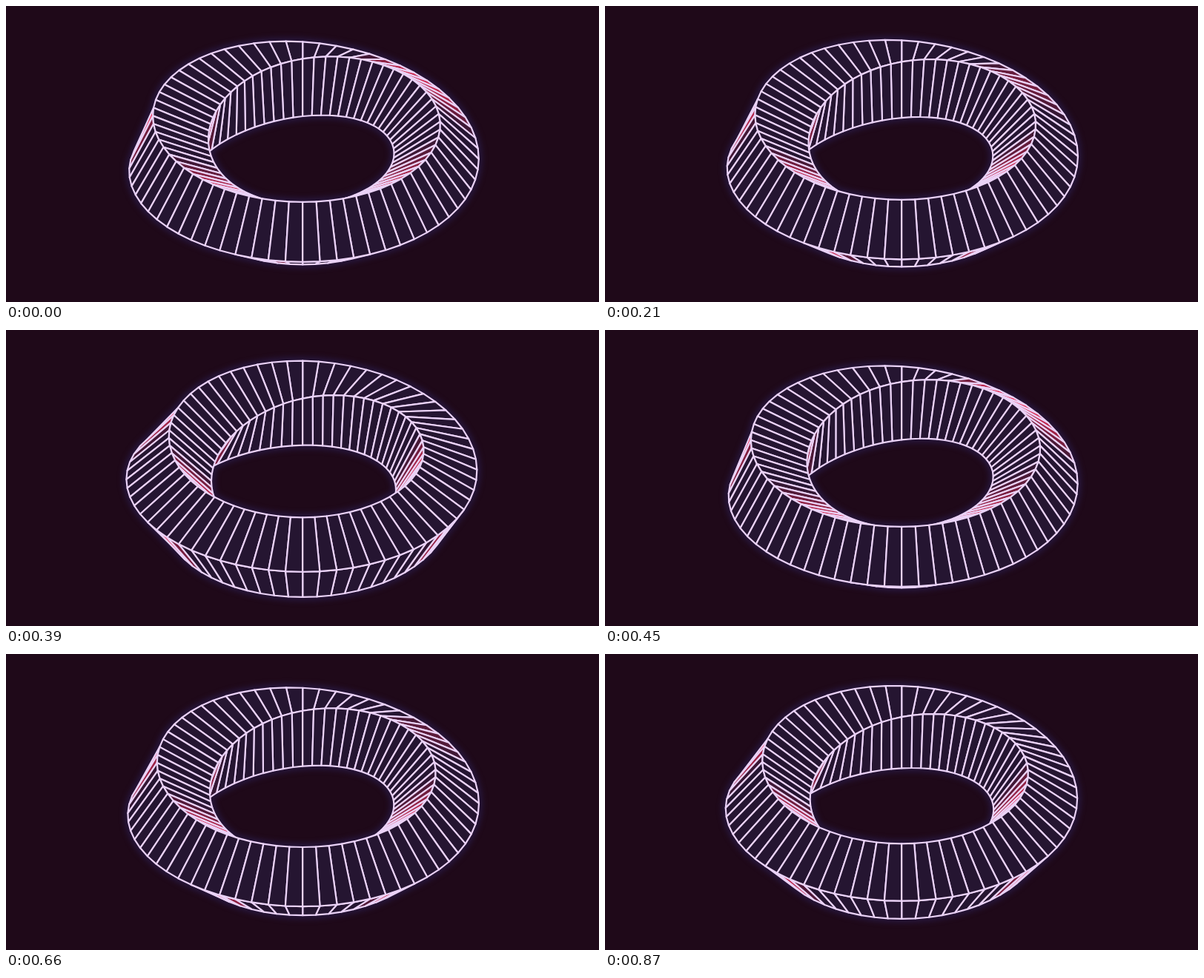
An HTML page with a canvas that plays this animation: 800x400 px, repeating every 0.9 s.

```html
<!DOCTYPE html>
<html lang="en">
<head>
<meta charset="utf-8">
<title>Twisted ring</title>
<style>
  html, body { margin: 0; width: 100%; height: 100%; overflow: hidden; background: #1f0919; }
  canvas { display: block; }
</style>
</head>
<body>
<canvas id="stage" width="800" height="400"></canvas>
<script>
const ctx = document.getElementById('stage').getContext('2d');
const TAU = Math.PI * 2, RAD = Math.PI / 180;
const SEGMENTS = 64, RADIUS = 180.5, SIZE = 57.3;
const LOOP = 900, STEP = 30;
const TILT_SIN = Math.sqrt(1 / 3), TILT_COS = Math.sqrt(2 / 3);
const TWIST_CENTRE = 202 * RAD;
const DARK = [37, 21, 49], HOT = [255, 45, 85];

// A quarter twist per lap, concentrated around TWIST_CENTRE.
function twist(theta) {
  const d = theta - TWIST_CENTRE;
  return d / 4 + 15.5 * RAD * Math.sin(d);
}

// One full turn per loop, slowing down slightly.
function spinAt(time) {
  const u = Math.floor(time % LOOP / STEP) * STEP / LOOP;
  return TAU * (u + 0.034 * u * (0.73 - u));
}

// Corner of the square section at ring angle theta (0 = nearest the viewer).
function corner(theta, side, spin) {
  const a = twist(theta) + 37.5 * RAD + side * TAU / 4 - spin;
  const rho = RADIUS + SIZE * Math.cos(a);
  const up = SIZE * Math.sin(a);
  const near = rho * Math.cos(theta);
  return {
    x: 400.2 + rho * Math.sin(theta),
    y: 202.9 + near * TILT_SIN - up * TILT_COS,
    depth: near * TILT_COS + up * TILT_SIN
  };
}

function visibleQuads(spin) {
  const quads = [];
  for (let i = 0; i < SEGMENTS; i++) {
    const t0 = i / SEGMENTS * TAU, t1 = (i + 1) / SEGMENTS * TAU;
    for (let side = 0; side < 4; side++) {
      const p = [corner(t0, side, spin), corner(t1, side, spin),
                 corner(t1, side + 1, spin), corner(t0, side + 1, spin)];
      const area = p.reduce((sum, v, k) => {
        const w = p[(k + 1) % 4];
        return sum + (v.x * w.y - w.x * v.y) / 2;
      }, 0);
      if (area >= 0) continue;
      const bar = Math.hypot(p[3].x - p[0].x, p[3].y - p[0].y);
      quads.push({
        p,
        gap: -area / Math.max(bar, 1),
        depth: p.reduce((sum, v) => sum + v.depth, 0)
      });
    }
  }
  return quads.sort((a, b) => a.depth - b.depth);
}

function trace(path, p) {
  p.forEach((v, k) => k ? path.lineTo(v.x, v.y) : path.moveTo(v.x, v.y));
  path.closePath();
}

// Narrow gaps between the bars glow red.
function fillFor(gap) {
  const k = Math.min(1, Math.max(0, (6.5 - gap) / 4.5));
  return `rgb(${DARK.map((c, n) => Math.round(c + (HOT[n] - c) * k))})`;
}

function draw(time) {
  const quads = visibleQuads(spinAt(time));
  ctx.fillStyle = '#1f0919';
  ctx.fillRect(0, 0, 800, 400);
  ctx.lineJoin = 'round';

  const halo = new Path2D();
  quads.forEach(q => trace(halo, q.p));
  ctx.filter = 'blur(3px)';
  ctx.strokeStyle = '#251436';
  ctx.lineWidth = 12;
  ctx.stroke(halo);
  ctx.filter = 'none';

  ctx.strokeStyle = '#ead2f6';
  ctx.lineWidth = 2.2;
  for (const q of quads) {
    const shape = new Path2D();
    trace(shape, q.p);
    ctx.fillStyle = fillFor(q.gap);
    ctx.fill(shape);
    ctx.stroke(shape);
  }
}

const start = performance.now();
function tick() {
  draw(performance.now() - start);
  requestAnimationFrame(tick);
}
tick();
</script>
</body>
</html>
```
